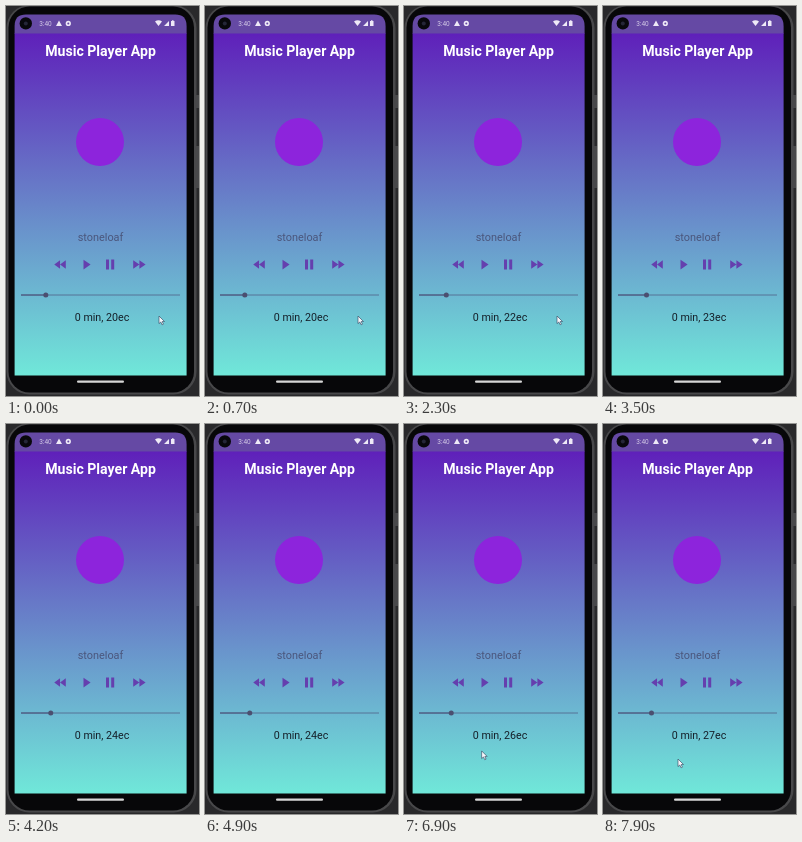
An HTML page that plays this animation: 193 px wide and 390 px high, repeating every 8000 ms.

```html
<!DOCTYPE html>
<html lang="en">
<head>
<meta charset="utf-8">
<title>Music Player App</title>
<style>
  html, body { margin: 0; width: 100%; height: 100%; overflow: hidden; background: #29292b; }
  svg { display: block; width: 100vw; height: 100vh; }
  text { font-family: Roboto, "Open Sans", sans-serif; text-anchor: middle; }
</style>
</head>
<body>
<svg viewBox="0 0 193 390">
  <defs>
    <linearGradient id="sky" x1="0" y1="0" x2="0" y2="1">
      <stop offset="0" stop-color="#5f20ba"/>
      <stop offset="0.5" stop-color="#6884c9"/>
      <stop offset="1" stop-color="#70e8d9"/>
    </linearGradient>
    <clipPath id="screen"><path d="M8.6 369.6V20Q8.6 8.6 20 8.6H169.2Q180.6 8.6 180.6 20V369.6Z"/></clipPath>
    <path id="skip" d="M0 0L6.2 4.2L0 8.4ZM6.2 0L12.4 4.2L6.2 8.4Z"/>
  </defs>

  <!-- phone body -->
  <path d="M190 89h3v13h-3zM190 140h3v42h-3z" fill="#48484a"/>
  <rect x="0.5" y="-1" width="190" height="389.5" rx="23" fill="#48484a"/>
  <rect x="2.5" y="0.5" width="185.5" height="386" rx="21" fill="#070709"/>

  <g clip-path="url(#screen)">
    <rect x="8" y="27" width="173" height="343" fill="url(#sky)"/>
    <rect x="8" y="8" width="173" height="19.5" fill="#6549a4"/>
  </g>
  <rect x="71" y="374.6" width="47" height="2.2" rx="1.1" fill="#d6d6d6"/>

  <!-- status bar -->
  <circle cx="19.8" cy="17.4" r="6.2" fill="#08080c"/>
  <circle cx="19.8" cy="17.4" r="2" fill="#252638"/>
  <g fill="#eee9f7">
    <text x="39.5" y="20" font-size="6.5" opacity=".8">3:40</text>
    <path d="M53 14.5l3 5.5h-6zM149 15.5q3.5-2.5 7 0l-3.5 4.5zM158 20l5-5v5zM165 15h1v-.8h1.5v.8h1v5h-3.5z"/>
    <circle cx="62.3" cy="17.4" r="2.6"/>
  </g>
  <circle cx="62.3" cy="17.4" r="1" fill="#6549a4"/>

  <text x="94.5" y="50" font-size="14.1" font-weight="700" fill="#fff">Music Player App</text>
  <circle cx="94" cy="136" r="24" fill="#8d24dc"/>
  <text x="94.5" y="234.5" font-size="10.9" fill="#4b567c">stoneloaf</text>

  <!-- controls -->
  <g fill="#653fae">
    <use href="#skip" transform="translate(59.8 254.3) scale(-.93 1)"/>
    <path d="M77.5 253.8L84.6 258.6L77.5 263.4ZM100 253.6h3v10h-3zM105.2 253.6h3v10h-3z"/>
    <use href="#skip" transform="translate(127.2 254.3)"/>
  </g>

  <!-- progress -->
  <path d="M15 289H174" stroke="#54698f" stroke-width=".9"/>
  <path id="played" stroke="#4a5178"/>
  <circle id="thumb" cy="289" r="2.5" fill="#4b4f70"/>
  <text id="clock" x="96" y="314.5" font-size="10.7" fill="#15202a"></text>

  <path id="cursor" d="M0 0V7.6L1.8 6L3.1 8.8L4.4 8.2L3.2 5.5H5.5Z" fill="#f6f6fa" stroke="#30405c" stroke-width=".6"/>
</svg>
<script>
const LOOP = 8000;
const FIRST_SECOND = 20;
const el = id => document.getElementById(id);
const [played, thumb, clock, cursor] = ["played", "thumb", "clock", "cursor"].map(el);

// time, x, y of the pointer tip
const path = [
  [0, 153, 310], [2500, 153, 310], [2900, 196, 392],
  [5100, 196, 362], [5250, 165, 358], [5700, 101, 256],
  [6500, 101, 256], [7000, 75, 335], [LOOP, 75, 335]
];

const ease = u => u * u * (3 - 2 * u);

function pointerAt(t) {
  const i = path.findIndex(p => p[0] > t);
  const [t0, x0, y0] = path[i - 1], [t1, x1, y1] = path[i];
  const u = ease((t - t0) / (t1 - t0));
  return [x0 + (x1 - x0) * u, y0 + (y1 - y0) * u];
}

function draw(t) {
  // the counter ticks 100 ms after each full second
  const sec = FIRST_SECOND + Math.max(0, Math.floor((t - 100) / 1000));
  const x = 15 + 1.24 * sec;
  played.setAttribute("d", `M15 289H${x}`);
  thumb.setAttribute("cx", x);
  clock.textContent = `0 min, ${sec}ec`;
  cursor.setAttribute("transform", `translate(${pointerAt(t)})`);
}

const start = performance.now();
function tick() {
  draw((performance.now() - start) % LOOP);
  requestAnimationFrame(tick);
}
tick();
</script>
</body>
</html>
```
